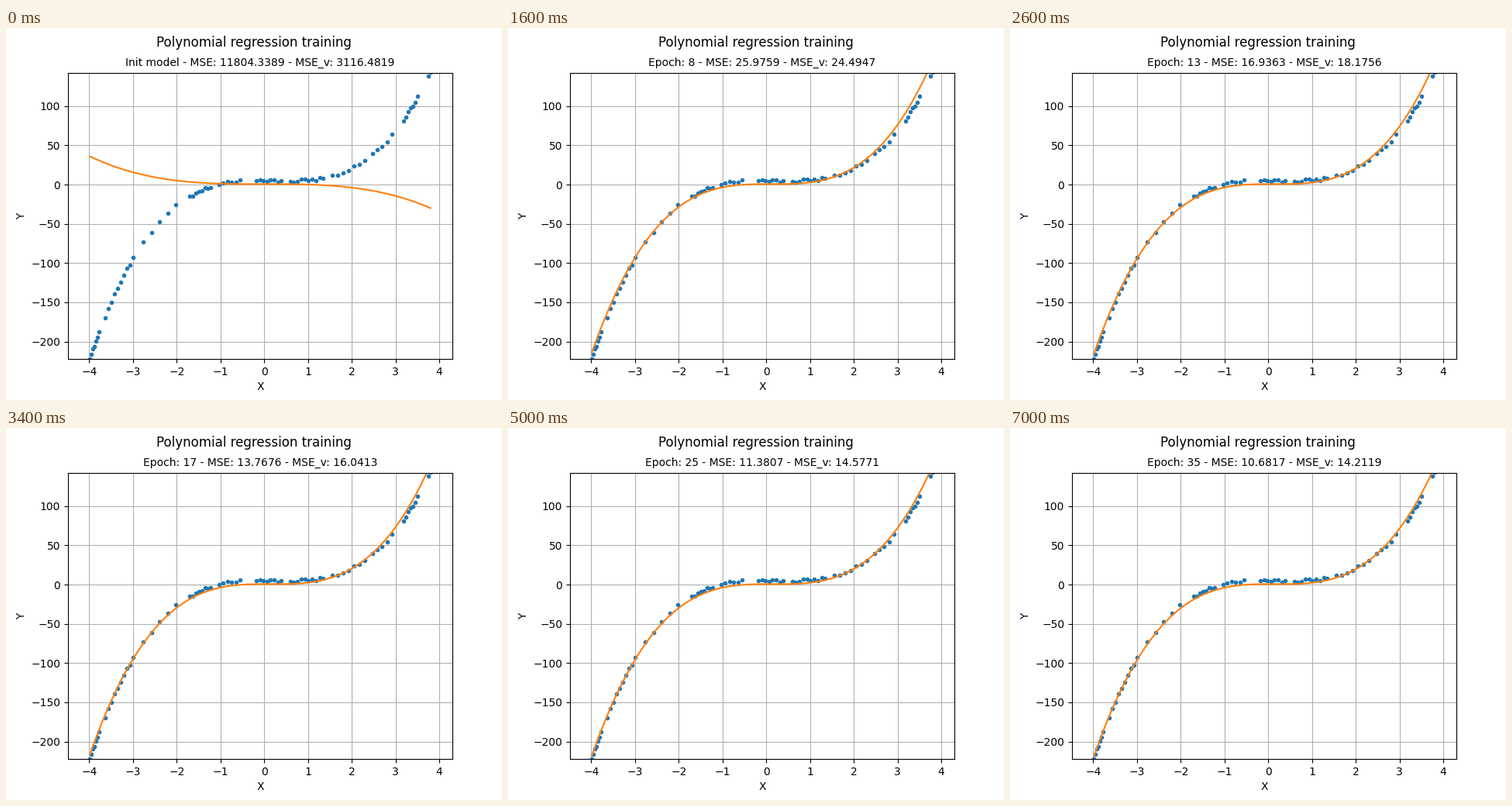
A matplotlib script that plays this animation: 640 px wide and 480 px high, repeating every 7200 ms.

```python
import numpy as np
import matplotlib.pyplot as plt
from matplotlib.animation import FuncAnimation

EPOCHS = 36
INTERVAL = 200
X_MIN, X_MAX = -3.9866, 3.8014

# Clusters of samples along x: first, last, count.
CLUSTERS = [
    (X_MIN, -3.77, 7), (-3.63, -2.99, 10), (-2.76, -2.02, 5), (-1.70, -1.22, 8),
    (-1.04, -0.55, 6), (-0.18, 0.39, 8), (0.59, 1.35, 10), (1.56, 2.30, 7),
    (2.47, 2.92, 5), (3.19, 3.51, 7), (3.76, X_MAX, 2)]

# Key losses (epoch, training, validation) and the values they decay towards.
LOSSES = np.array([
    (0, 11804.3389, 3116.4819), (3, 76.4996, 31.0847), (8, 25.9759, 24.4947),
    (13, 16.9363, 18.1756), (21, 12.1662, 15.0358), (29, 10.9723, 14.3533),
    (35, 10.6817, 14.2119)])
FLOORS = 10.53, 14.14


def make_samples():
    """Noisy cubic over the clusters of x."""
    rng = np.random.default_rng(4)
    x = np.concatenate([np.linspace(*cluster) for cluster in CLUSTERS])
    noise = rng.uniform(-2, 2, x.size)
    noise[[0, -1]] = 0
    return x, np.polyval([3.1, -2.1, -0.6, 5], x) + noise


def loss(n, column):
    """Exponential decay between the key losses."""
    floor = FLOORS[column - 1]
    excess = np.log(LOSSES[:, column] - floor)
    return floor + np.exp(np.interp(n, LOSSES[:, 0], excess))


def predict(x, n):
    """Cubic model after n epochs: one fast and one slow mode of descent."""
    fast, slow = 0.26 ** n, np.exp(-0.086 * n)
    a = 3.095 + 0.066 * slow - 3.718 * fast
    b = -1.5 + 0.965 * slow + 0.535 * fast
    return np.polyval([a, b, 0, 0.6], x)


fig, ax = plt.subplots(figsize=(6.4, 4.8), dpi=100)
fig.suptitle("Polynomial regression training", fontsize=12)
title = ax.set_title("", fontsize=10)
ax.set_xlabel("X")
ax.set_ylabel("Y")
ax.grid(True)
ax.plot(*make_samples(), ".")
grid_x = np.linspace(X_MIN, X_MAX, 200)
curve, = ax.plot(grid_x, predict(grid_x, 0))
ax.set_xlim(X_MIN - 0.5, X_MAX + 0.5)
ax.set_ylim(-222.27, 142.55)


def update(n):
    name = f"Epoch: {n}" if n else "Init model"
    title.set_text(f"{name} - MSE: {loss(n, 1):.4f} - MSE_v: {loss(n, 2):.4f}")
    curve.set_ydata(predict(grid_x, n))
    return curve, title


anim = FuncAnimation(fig, update, frames=EPOCHS, interval=INTERVAL,
                     repeat=True, repeat_delay=0)
plt.show()
```
